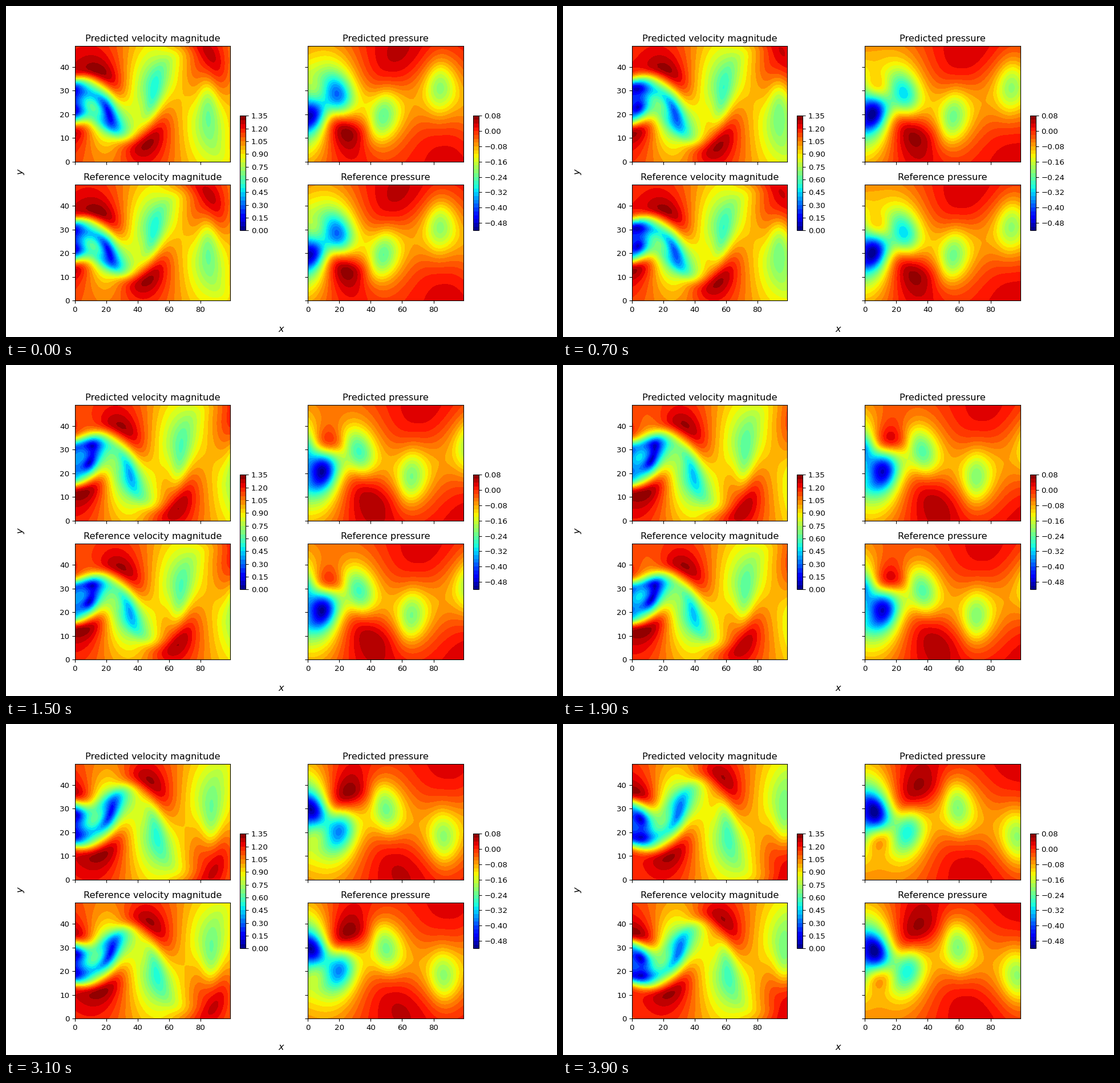
Animation of 966x580 px, one loop 4 s. Source, as a matplotlib script:

```python
import numpy as np
import matplotlib.pyplot as plt
from matplotlib.animation import FuncAnimation

WIDTH, HEIGHT, DPI = 966, 580, 96.6
FRAMES, INTERVAL = 40, 100
CYCLE = 59              # frames per shedding period

# Flow past a cylinder near Re = 100, pseudo-spectral with a penalised solid
NX, NY, H, DT, NU = 180, 144, 0.1, 0.03, 0.0103
X0, Y0 = -4.0, -NY * H / 2
SETTLE, RECORD, STRIDE = 1190, 420, 2


def build_grid():
    x = X0 + H * np.arange(NX)
    y = (Y0 + H * np.arange(NY))[:, None]
    solid = 1 - np.tanh((np.hypot(x, y) - 0.45) / 0.04)
    fringe = np.where(x > 11.8, np.sin(np.pi * (x - 11.8) / 2.2) ** 2, 0)
    kx = 2 * np.pi * np.fft.rfftfreq(NX, H)
    ky = 2 * np.pi * np.fft.fftfreq(NY, H)[:, None]
    return solid, 4 * DT * fringe, kx, ky


def simulate():
    """Return snapshots of u, v and p on the 50 x 100 viewing window."""
    solid, fringe, kx, ky = build_grid()
    total = 1 + solid + fringe
    k2 = kx**2 + ky**2
    nyquist = np.pi / H
    damp = np.exp(-NU * k2 * DT - 36 * (kx / nyquist)**12 - 36 * (ky / nyquist)**12)
    k2[0, 0] = 1

    view_x = np.linspace(1, 8, 100) - X0
    view_y = np.linspace(-2, 2, 50)[:, None] - Y0
    to_x = np.exp(1j * kx[:, None] * view_x) * np.where(kx > 0, 2, 1)[:, None]
    to_y = np.exp(1j * view_y * ky.T) / (NX * NY)

    hat = np.zeros((2, NY, kx.size), complex)
    hat[0, 0, 0] = NX * NY
    old, shots = None, []
    for n in range(SETTLE + RECORD):
        curl = 1j * (kx * hat[1] - ky * hat[0])
        u, v, w = np.fft.irfft2(np.stack([hat[0], hat[1], curl]), s=(NY, NX))
        adv = np.stack([v * w, -u * w])
        old = adv if old is None else old
        step = DT * (1.5 * adv - 0.5 * old)
        old = adv
        # A fading sideways shake of the solid starts the shedding
        t = n * DT
        heave = 0.5 * np.sin(2 * np.pi * t / 6) * np.exp(-(t / 12)**4)
        hat = np.fft.rfft2(np.stack([(u + step[0] + fringe) / total,
                                     (v + step[1] + solid * heave) / total]))
        phi = (kx * hat[0] + ky * hat[1]) / k2
        hat[0] -= kx * phi
        hat[1] -= ky * phi
        hat *= damp
        if n >= SETTLE and n % STRIDE == 0:
            fields = np.stack([hat[0], hat[1], -1j * phi / DT])
            shot = (to_y @ fields @ to_x).real
            shot[2] -= 0.5 * (shot[0]**2 + shot[1]**2)
            shots.append(shot)
    return np.array(shots)


def sample_cycle(shots):
    """Pick evenly spaced frames, locked to the shedding phase."""
    probe = shots[:, 1, 24:26, 50].mean(axis=1)
    down = np.flatnonzero((probe[:-1] > 0) & (probe[1:] <= 0))
    cross = down + probe[down] / (probe[down] - probe[down + 1])
    period = cross[1] - cross[0]
    pos = cross[0] + period * np.arange(FRAMES) / CYCLE
    i = pos.astype(int)
    f = (pos - i)[:, None, None, None]
    return (1 - f) * shots[i] + f * shots[i + 1]


def stretch_rows(field, scale):
    """Widen the field about its centre line."""
    rows = 24.5 + scale * (np.arange(50) - 24.5)
    i = np.minimum(rows.astype(int), 48)
    f = (rows - i)[:, None]
    return (1 - f) * field[:, i] + f * field[:, i + 1]


flow = sample_cycle(simulate())
speed = np.hypot(flow[:, 0], flow[:, 1])
pressure = 0.9 * (flow[:, 2] - flow[:, 2].max()) + 0.072

speed_levels = np.linspace(0, 1.35, 28)
pressure_levels = np.linspace(-0.52, 0.08, 31)

# The hundredth of a pixel keeps the canvas from rounding down
fig, axes = plt.subplots(2, 2, sharex=True, sharey=True, dpi=DPI,
                         figsize=((WIDTH + 0.01) / DPI, (HEIGHT + 0.01) / DPI))
fig.subplots_adjust(left=0.125, right=0.83, bottom=0.11, top=0.88, wspace=0.5, hspace=0.2)
fig.supxlabel("$x$")
fig.supylabel("$y$")

panels = [
    (axes[0, 0], "Predicted velocity magnitude", stretch_rows(speed, 0.94), speed_levels),
    (axes[1, 0], "Reference velocity magnitude", speed, speed_levels),
    (axes[0, 1], "Predicted pressure", stretch_rows(pressure, 0.98), pressure_levels),
    (axes[1, 1], "Reference pressure", pressure, pressure_levels),
]
drawn = []


def update(k):
    while drawn:
        drawn.pop().remove()
    for ax, _, data, levels in panels:
        inside = np.clip(data[k], levels[0] + 1e-6, levels[-1] - 1e-6)
        drawn.append(ax.contourf(inside, levels=levels, cmap="jet"))


update(0)
for ax, title, _, _ in panels:
    ax.set_title(title)
for filled, left in ((drawn[0], 410.2), (drawn[2], 818.8)):
    fig.colorbar(filled, cax=fig.add_axes([left / WIDTH, 0.32175, 10.05 / WIDTH, 0.3465]))

anim = FuncAnimation(fig, update, frames=FRAMES, interval=INTERVAL,
                     init_func=lambda: None, repeat=True, cache_frame_data=False)
plt.show()
```
